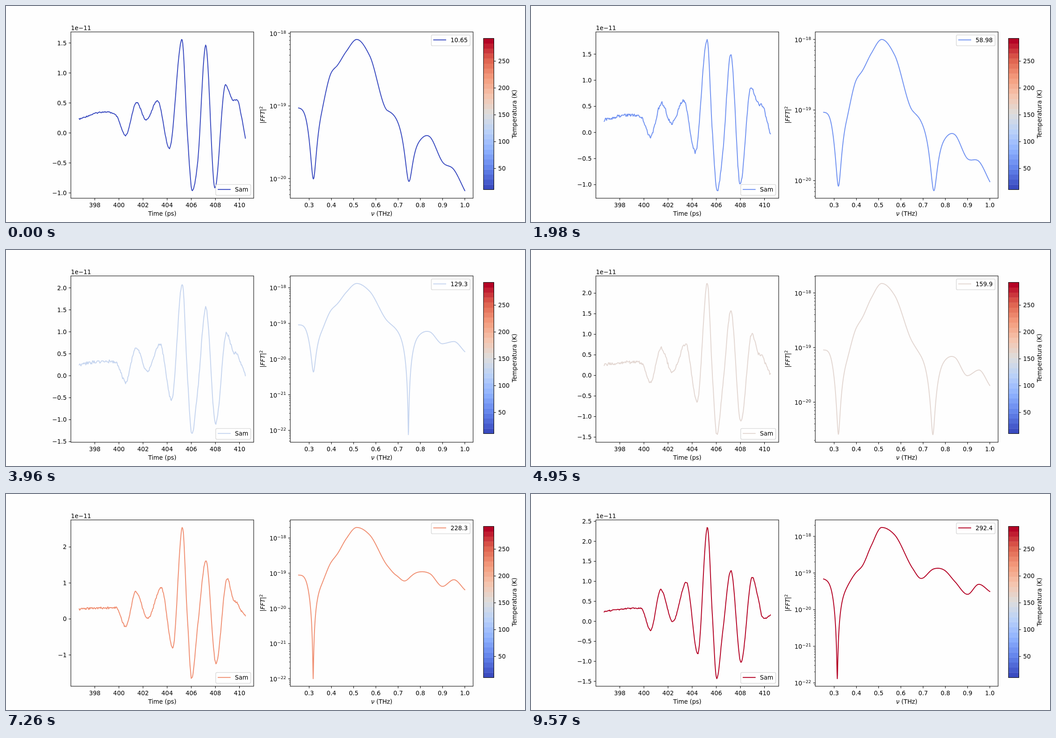
Recreate the animation shown at these times as an HTML page. Size 1159 px wide and 483 px high, loop 9.9 s.

```html
<!DOCTYPE html>
<html lang="en">
<head>
<meta charset="utf-8">
<title>Pulse and spectrum against temperature</title>
<style>
  html, body { margin: 0; width: 100%; height: 100%; overflow: hidden; background: #fefefe; }
  svg { display: block; width: 100%; height: 100%; }
  text { font: 13.41px "DejaVu Sans", sans-serif; fill: #000; }
  .sup { font-size: 9.39px; }
  .it { font-style: italic; }
  .end { text-anchor: end; }
  .mid { text-anchor: middle; }
  .axis { fill: none; stroke: #000; stroke-width: 1.07; }
  .minor { stroke-width: .8; }
  .box { fill: #fff; fill-opacity: .8; stroke: #ccc; stroke-opacity: .8; stroke-width: 1.34; }
  .line { fill: none; stroke-width: 2.01; stroke-linejoin: round; stroke-linecap: square; }
</style>
</head>
<body>
<svg id="stage" viewBox="0 0 1159 483"></svg>
<script>
const LOOP = 9900, STEP = 330;
const EM = 13.41, TICK = 4.69, PAD = 9.39;
const TOP = 57.96, BOTTOM = 429.87, WIDTH = 408.27;
const LEFT = 144.88, RIGHT = 634.83;
const Y_HI = 74.86, Y_LO = 412.97;          // where the data's maximum and minimum land
const BAR = { x: 1066.3, y: 72.45, w: 23.2, h: 338.1 };
const T_MIN = 10.65, T_MID = 228.3, T_MAX = 292.4;

const mix = (a, b, f) => a + (b - a) * f;
const clamp = (v, a, b) => Math.min(b, Math.max(a, v));
const warmth = temp => (temp - T_MIN) / (T_MAX - T_MIN);

// Piecewise linear value through [x, y] points.
function along(points, x) {
  const i = Math.max(1, points.findIndex(p => p[0] >= x));
  const [a, b] = [points[i - 1], points[i]];
  return mix(a[1], b[1], (x - a[0]) / (b[0] - a[0]));
}

const blend = (temp, cold, mid, warm) => along([[T_MIN, cold], [T_MID, mid], [T_MAX, warm]], temp);

// Temperature of each measurement.
const HEATING = [[0, T_MIN], [3, 23.55], [8, 82.6], [12, 129.3], [18, 190.4], [22, T_MID], [29, T_MAX]];

const WARM = [[59, 76, 192], [98, 130, 234], [141, 176, 254], [184, 208, 249], [221, 221, 221],
  [245, 196, 173], [244, 154, 123], [222, 96, 77], [180, 4, 38]];

function color(u) {
  const p = clamp(u, 0, 1) * (WARM.length - 1);
  const i = Math.min(WARM.length - 2, Math.floor(p));
  return `rgb(${WARM[i].map((v, c) => Math.round(mix(v, WARM[i + 1][c], p - i)))})`;
}

// Turning points of the pulse: x, drift on heating, then cold, middle and warm heights.
const PULSE = [
  [163.5, 0, .23, .27, .25], [218, 0, .35, .31, .32], [246, 0, .29, .31, .33],
  [267, 0, -.045, -.218, -.223], [291.5, -1.5, .51, .755, .796], [313, 3.5, .217, .016, -.01],
  [338.5, 8.5, .538, .865, .975], [365, 7.5, -.254, -.808, -.805], [393, 1, 1.562, 2.55, 2.354],
  [405, 0, 0, .05, .15], [416, -1.3, -.963, -1.66, -1.434], [428, 0, -.49, -.2, -.28],
  [446, .5, 1.46, 1.62, 1.272], [466.5, 2.5, -.92, -1.24, -1.03], [490, 4, .8, 1.12, 1.098],
  [508, 0, .545, .53, .54], [517, 0, .55, .43, .1], [524, 0, .34, .25, .08], [534.6, 0, -.09, .09, .16]];

// Spectrum without its notches: x, then cold, middle and warm powers of ten.
const ENVELOPE = [
  [653.4, -18.84, -18.85, -18.94], [672, -18.7, -18.68, -18.81], [704, -18.67, -18.88, -19.02],
  [726, -18.4, -18.54, -18.85], [740, -18.35, -18.36, -18.72], [760, -18.19, -17.96, -18.2],
  [783, -18.04, -17.66, -17.72], [812, -18.26, -17.87, -17.92], [852, -18.96, -18.7, -18.76],
  [870, -18.95, -18.85, -18.95], [899.5, -19.01, -18.83, -18.8], [923, -19.2, -18.855, -18.885],
  [947, -19.33, -18.97, -19.22], [975, -19.73, -19.35, -19.57], [1000, -19.85, -19.17, -19.3],
  [1024.6, -20.15, -19.46, -19.5]];
const NOTCH = 25;

// Cubic Hermite curve that is flat at its extrema.
function curve(pts) {
  const n = pts.length - 1;
  const h = [], d = [];
  for (let i = 0; i < n; i++) {
    h[i] = pts[i + 1][0] - pts[i][0];
    d[i] = (pts[i + 1][1] - pts[i][1]) / h[i];
  }
  const slope = i => {
    if (i === 0) return d[0];
    if (i === n) return d[n - 1];
    const a = d[i - 1], b = d[i];
    if (a * b <= 0) return 0;
    const most = 3 * Math.min(Math.abs(a), Math.abs(b));
    return clamp((a * h[i] + b * h[i - 1]) / (h[i] + h[i - 1]), -most, most);
  };
  return x => {
    let i = 0;
    while (i < n - 1 && x > pts[i + 1][0]) i++;
    const u = (x - pts[i][0]) / h[i], v = 1 - u;
    return pts[i][1] * v * v * (1 + 2 * u) + pts[i + 1][1] * u * u * (3 - 2 * u)
      + h[i] * u * v * (slope(i) * v - slope(i + 1) * u);
  };
}

function sample(f, x0, x1, count) {
  const pts = Array.from({ length: count + 1 }, (_, i) => {
    const x = mix(x0, x1, i / count);
    return [x, f(x)];
  });
  const ys = pts.map(p => p[1]);
  return { pts, lo: Math.min(...ys), hi: Math.max(...ys) };
}

function pulse(temp) {
  const drift = Math.min(1, warmth(temp) / .65);
  const f = curve(PULSE.map(([x, dx, ...heights]) => [x + dx * drift, blend(temp, ...heights)]));
  return sample(f, 163.44, 534.6, 276);
}

const notch = (x, depth) => Math.log10((x * x + depth * depth) / (x * x + NOTCH * NOTCH));

function spectrum(temp) {
  const u = warmth(temp);
  const envelope = curve(ENVELOPE.map(([x, ...powers]) => [x, blend(temp, ...powers)]));
  const x1 = 686.5 - 2.5 * u ** 6, depth1 = Math.max(.78 * u, 5.5 - 7.85 * u ** 1.8);
  const x2 = 899.5 - 26 * u ** 4, depth2 = Math.min(20, Math.abs(7.7 - 40 * u * u));
  return sample(x => envelope(x) + notch(x - x1, depth1) + notch(x - x2, depth2), 653.4, 1024.6, 742);
}

function random(i, seed) {
  const s = Math.sin(i * 12.9898 + seed * 78.233) * 43758.5453;
  return s - Math.floor(s);
}

const level = (v, lo, hi) => mix(Y_LO, Y_HI, (v - lo) / (hi - lo));

function path({ pts, lo, hi }, stroke, rough = y => y) {
  const d = pts.map(([x, v], i) => `${x.toFixed(2)} ${rough(level(v, lo, hi), i).toFixed(2)}`);
  return `<path class="line" stroke="${stroke}" d="M${d.join("L")}"/>`;
}

// Measurement noise, rounded to the detector's grain.
function noisy(temp, seed) {
  const size = 1.2 + 2.2 * Math.sin(Math.PI * Math.sqrt(warmth(temp)));
  const grain = size * .7;
  return (y, i) => {
    const shaken = y + (random(i, seed) * 2 - 1) * size;
    return clamp(Math.round(shaken / grain) * grain, Y_HI, Y_LO);
  };
}

const text = (x, y, str, cls = "") => `<text x="${x}" y="${y}" class="${cls}">${str}</text>`;
const turned = (x, y, str) => `<text class="mid" transform="translate(${x} ${y}) rotate(-90)">${str}</text>`;
const rect = (x, y, w, h, attrs) => `<rect x="${x}" y="${y}" width="${w}" height="${h}" ${attrs}/>`;
const tick = (x, y, dx, dy, cls = "") => `<path class="axis ${cls}" d="M${x} ${y}l${dx} ${dy}"/>`;
const signed = str => str.replace("-", "\u2212");
const inside = y => y >= TOP && y <= BOTTOM;

function linearTicks({ lo, hi }) {
  const margin = (hi - lo) * .05;
  const gap = [.1, .2, .25, .5, 1, 2].find(g => g >= (hi - lo + 2 * margin) / 9);
  let out = "";
  for (let n = Math.ceil((lo - margin) / gap); n * gap <= hi + margin; n++) {
    const y = level(n * gap, lo, hi);
    out += tick(LEFT, y, -TICK, 0) + text(LEFT - PAD, y + 4.9, signed((n * gap).toFixed(gap < 1 ? 1 : 0)), "end");
  }
  return out;
}

function logTicks({ lo, hi }) {
  let out = "";
  for (let e = Math.floor(lo) - 1; e <= hi + 1; e++) {
    for (let m = 1; m < 10; m++) {
      const y = level(e + Math.log10(m), lo, hi);
      if (!inside(y)) continue;
      out += m > 1 ? tick(RIGHT, y, -2.68, 0, "minor")
        : tick(RIGHT, y, -TICK, 0)
          + text(RIGHT - PAD, y + 5.9, `10<tspan class="sup" dy="-5.1">${signed(String(e))}</tspan>`, "end");
    }
  }
  return out;
}

function legend(right, y, label, em, stroke) {
  const w = 3.6 * EM + em * EM, x = right - w;
  return rect(x, y, w, 24.1, 'rx="2.7" class="box"')
    + `<path class="line" stroke="${stroke}" d="M${x + .4 * EM} ${y + 11}h${2 * EM}"/>`
    + text(x + 3.2 * EM, y + 16, label);
}

function fixedParts() {
  let out = rect(0, 0, 1159, 483, 'fill="#fefefe"');
  for (let t = 398; t <= 410; t += 2) {
    const x = 198.3 + (t - 398) * 26.93;
    out += tick(x, BOTTOM, 0, TICK) + text(x, 449.6, t, "mid");
  }
  for (let n = 3; n <= 10; n++) {
    const x = 677 + (n - 3) * 49.66;
    out += tick(x, BOTTOM, 0, TICK) + text(x, 449.6, (n / 10).toFixed(1), "mid");
  }
  out += text(LEFT, 53.7, "1e\u221211") + text(349, 469, "Time (ps)", "mid")
    + text(839, 469, '<tspan class="it">\u03bd</tspan> (THz)', "mid")
    + turned(578, 243.5, '|<tspan class="it">FFT</tspan>|<tspan class="sup" dy="-5.1">2</tspan>');

  const bands = 30, h = BAR.h / bands;
  for (let i = 0; i < bands; i++) {
    out += rect(BAR.x, BAR.y + BAR.h - (i + 1) * h, BAR.w, h + .3, `fill="${color(i / (bands - 1))}"`);
  }
  out += rect(BAR.x, BAR.y, BAR.w, BAR.h, 'class="axis"');
  for (let t = 50; t <= 250; t += 50) {
    const y = BAR.y + BAR.h * (1 - warmth(t));
    out += tick(BAR.x + BAR.w, y, TICK, 0) + text(BAR.x + BAR.w + PAD, y + 4.9, t);
  }
  return out + turned(1140, 241.5, "Temperatura (K)");
}

function movingParts(step) {
  const temp = along(HEATING, step);
  const stroke = color(warmth(temp));
  const label = String(+temp.toPrecision(4));
  const em = [...label].reduce((sum, c) => sum + (c === "." ? .318 : .636), 0);
  const frame = x => rect(x, TOP, WIDTH, BOTTOM - TOP, 'class="axis"');
  const wave = pulse(temp), power = spectrum(temp);
  return linearTicks(wave) + logTicks(power)
    + path(wave, stroke, noisy(temp, step)) + path(power, stroke)
    + frame(LEFT) + frame(RIGHT)
    + legend(546.5, 399.2, "Sam", 2.222, stroke)
    + legend(1036.4, 64.8, label, em, stroke);
}

const stage = document.getElementById("stage");
stage.innerHTML = `${fixedParts()}<g id="moving"></g>`;
const moving = document.getElementById("moving");
let shown = -1;

function draw(ms) {
  const step = Math.floor((ms % LOOP) / STEP);
  if (step === shown) return;
  shown = step;
  moving.innerHTML = movingParts(step);
}

const start = performance.now();
function run() {
  draw(Math.max(0, performance.now() - start));
  requestAnimationFrame(run);
}
run();
</script>
</body>
</html>
```
